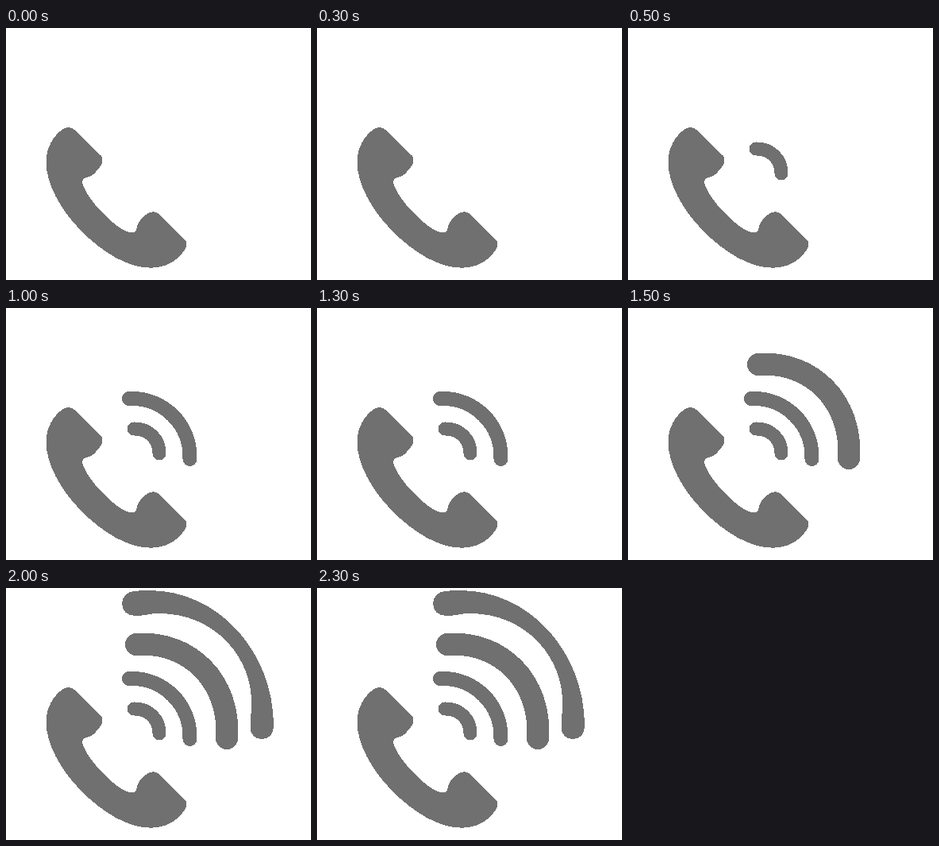
Recreate the animation shown at these times as an HTML page. Size 384x317 px, loop 2500 ms.

```html
<!DOCTYPE html>
<html lang="en">
<head>
<meta charset="utf-8">
<title>Ringing phone</title>
<style>
  html, body { margin: 0; width: 100%; height: 100%; overflow: hidden; background: #fff; }
  svg { display: block; width: 100%; height: 100%; shape-rendering: crispEdges; }
  .stroke { fill: none; stroke: #707070; stroke-linecap: round; }
</style>
</head>
<body>
<svg viewBox="0 0 384 317" fill="#707070">
  <path d="M70.500 128 Q79 122 87 128.500 L119.500 160.500 Q123.500 166 119.500 173 Q113 182 107.500 186
           C102 189 96.500 187 96 193 C96.500 201 107 218 122 233 C137 248 149 257 158 257.500
           C165 257.500 164 252 166 246.500 Q170 239 178 233.500 Q186 228.500 193.500 235
           L225 266 Q229.500 271 225 279 C216 293 201 301.700 182 301.700
           C153 301.700 121.500 282 95.500 256 C68.500 229 50.500 196 50.500 168 C50.500 151 59.500 136 70.500 128 Z"/>
  <g id="waves">
    <path class="stroke" stroke-width="17" d="M161 152 C179.500 151.500 193.500 165.500 193 183"/>
    <path class="stroke" stroke-width="18" d="M155 114 C198 112 233 147 231.500 190"/>
    <path class="stroke" stroke-width="28" d="M164 71 C232 66 283 119 278 189"/>
    <path d="M161 4 Q170 3 180 3 C268 3 337 81 337 174 C337 184 331 190 322 190
             C313 190 307.500 184 307.500 175 L309 150 C312 87 262 32 193 32
             C180 32 175 35 163 35 C153 35 146 29 146 20 C146 11 152 5 161 4 Z"/>
  </g>
</svg>
<script>
  const STEP = 500, LOOP = 2500;
  const waves = [...document.getElementById('waves').children];

  // Each step reveals one more wave; the loop begins with none.
  function draw() {
    const shown = Math.floor((performance.now() % LOOP) / STEP);
    waves.forEach((wave, i) => {
      wave.style.visibility = i < shown ? 'visible' : 'hidden';
    });
    requestAnimationFrame(draw);
  }
  draw();
</script>
</body>
</html>
```
